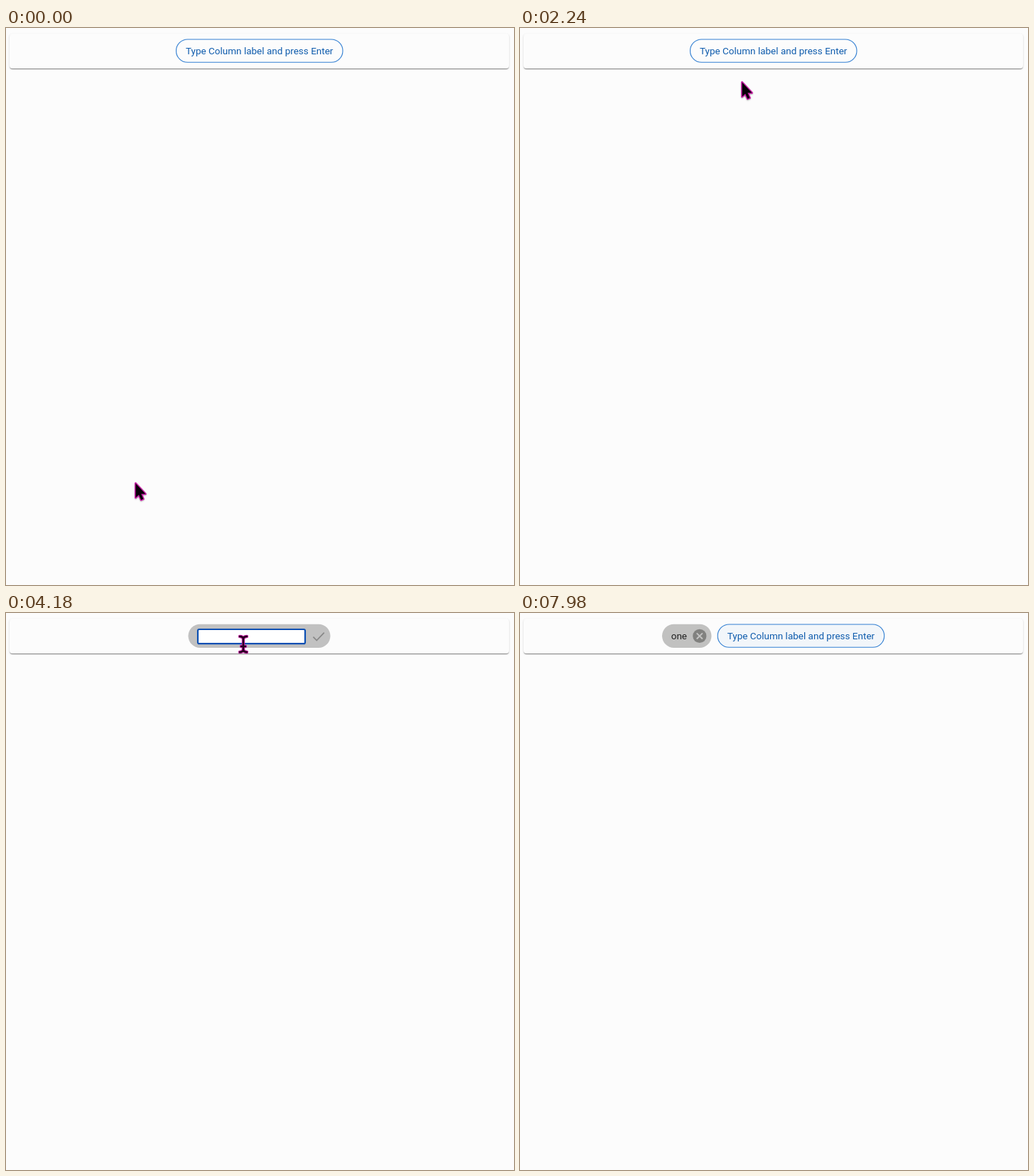
These frames come from a looping animation (715x784 px, 8 s). An HTML page with a canvas:

```html
<!DOCTYPE html>
<html lang="en">
<head>
<meta charset="utf-8">
<title>Column labels</title>
<style>
  html, body { margin: 0; width: 100%; height: 100%; overflow: hidden; background: #fcfcfc; }
  #paper {
    position: absolute; left: 5px; top: 8px; width: 703px; height: 49px; border-radius: 4px;
    background: #fcfcfc;
    box-shadow: 0 2px 1px -1px rgba(0,0,0,.28), 0 1px 1px rgba(0,0,0,.2), 0 1px 3px rgba(0,0,0,.12);
  }
  canvas { position: absolute; left: 0; top: 0; }
</style>
</head>
<body>
<div id="paper"></div>
<canvas id="stage" width="715" height="784"></canvas>
<script>
const ctx = document.getElementById('stage').getContext('2d');
const LOOP = 8000;
const PROMPT = 'Type Column label and press Enter';
const LABEL_FONT = '13.5px Roboto, sans-serif';
const INPUT_FONT = '14px "Liberation Sans", Arial, sans-serif';
const MAGENTA = '#c71fa5';

// Moments in the interaction, in ms
const HOVER = 2500, CLICK = 3400, ENTER = 6880, REFOCUS = 7700;
const KEYS = [[5300, 'o'], [5860, 'n'], [6320, 'e']];
const CARET_GAPS = [[4080, 4620], [5040, 5300]];

// Pointer hotspot: time, x, y
const POINTER = [
  [0, 181, 639], [20, 181, 639], [820, 227, 513], [1560, 211, 178], [1660, 211, 178],
  [1700, 262, 131], [1800, 262, 131], [2400, 329, 54], [2500, 329, 54], [2640, 336, 44]
];

const ARROW = new Path2D('M1.5 2.4V22.6L6 18.5L9.2 25.7L12.3 24.3L9.2 17.2H15.3Z');
const HAND = new Path2D('M4.5 2.5Q6.5 0 8.5 3L10.5 9.5Q12.5 7.5 14 9.5Q16 7.5 17.5 9.5Q20 8 21.2 11' +
  'Q23 15 20.5 19V24.5H9.5L8.5 21L1.5 15.5Q0 12.5 3 12.3L7.2 14Z');
const FINGERS = new Path2D('M12.5 15.5L13.2 20M15.7 15L16.4 20M18.7 14.5L19.2 19.5');
const IBEAM = new Path2D('M-5 -11Q0 -11 0 -7Q0 -11 5 -11M0 -7V7M-5 11Q0 11 0 7Q0 11 5 11M-3 3H3');

const clamp01 = v => Math.min(1, Math.max(0, v));
const progress = (t, start, duration) => clamp01((t - start) / duration);
const easeOut = p => 1 - (1 - p) * (1 - p);
const gray = v => `rgb(${v},${v},${v})`;

function pointerAt(t) {
  const i = POINTER.findIndex(k => k[0] > t);
  if (i < 0) return POINTER[POINTER.length - 1].slice(1);
  const [t0, x0, y0] = POINTER[i - 1], [t1, x1, y1] = POINTER[i];
  const p = (t - t0) / (t1 - t0);
  return [x0 + (x1 - x0) * p, y0 + (y1 - y0) * p];
}

function box(x, y, w, h, r, fill, stroke, lineWidth) {
  ctx.beginPath();
  ctx.roundRect(x, y, w, h, r);
  if (fill) { ctx.fillStyle = fill; ctx.fill(); }
  if (stroke) { ctx.strokeStyle = stroke; ctx.lineWidth = lineWidth; ctx.stroke(); }
}

function text(str, x, y, font, color, align = 'left') {
  ctx.font = font;
  ctx.textAlign = align;
  ctx.fillStyle = color;
  ctx.fillText(str, x, y);
}

function line(points, color, width) {
  ctx.beginPath();
  for (const [x, y] of points) ctx.lineTo(x, y);
  ctx.strokeStyle = color;
  ctx.lineWidth = width;
  ctx.stroke();
}

function promptButton(x, tint) {
  box(x + .5, 16, 234.5, 32.3, 16.15, `rgba(25,118,210,${tint})`, '#327fd2', 1.1);
  text(PROMPT, x + 117.7, 37.2, LABEL_FONT, '#0f5cad', 'center');
}

function editor(t) {
  const fade = easeOut(progress(t, CLICK, 340));
  box(256.5, 15.7, 200, 33.2, 16.6, gray(Math.round(224 - 31 * fade)));
  box(270, 23, 151, 20.2, 2, '#fff', '#0b4fb3', 2.2);
  const value = KEYS.filter(k => t >= k[0]).map(k => k[1]).join('');
  text(value, 273.2, 37.5, INPUT_FONT, '#000');
  if (!CARET_GAPS.some(([from, to]) => t >= from && t < to)) {
    ctx.fillRect(Math.round(273 + ctx.measureText(value).width), 25, 1, 15);
  }
  line([[432.4, 33.6], [437.3, 38.5], [447.8, 27.6]], gray(Math.round(168 - 32 * fade)), 1.7);
}

function labelChip() {
  box(200, 15.7, 69.5, 33.2, 16.6, '#c1c1c0');
  text('one', 212.7, 37.2, LABEL_FONT, '#1f1f1f');
  ctx.beginPath();
  ctx.arc(252.8, 32.4, 9.6, 0, Math.PI * 2);
  ctx.fillStyle = '#81817f';
  ctx.fill();
  line([[248.7, 28.3], [256.9, 36.5]], '#c4c4c3', 1.9);
  line([[256.9, 28.3], [248.7, 36.5]], '#c4c4c3', 1.9);
}

function strokePath(path, color, width) {
  ctx.strokeStyle = color;
  ctx.lineWidth = width;
  ctx.stroke(path);
}

function solidCursor(path, outline) {
  ctx.save();
  ctx.shadowColor = 'rgba(0,0,0,.25)';
  ctx.shadowBlur = 2;
  ctx.shadowOffsetY = 1;
  strokePath(path, MAGENTA, outline);
  ctx.restore();
  ctx.fillStyle = '#080008';
  ctx.fill(path);
}

function cursor(t) {
  if (t >= KEYS[0][0]) return;
  const [x, y] = pointerAt(t);
  ctx.save();
  ctx.lineJoin = 'round';
  if (t < HOVER) {
    ctx.translate(x, y - .5);
    solidCursor(ARROW, 3);
  } else if (t < CLICK) {
    ctx.translate(x - 6, y - 1);
    solidCursor(HAND, 2.4);
    strokePath(FINGERS, MAGENTA, .9);
  } else {
    ctx.translate(x - 2, y);
    ctx.lineCap = 'round';
    strokePath(IBEAM, MAGENTA, 4.4);
    strokePath(IBEAM, '#26001f', 2.4);
  }
  ctx.restore();
}

function draw(t) {
  ctx.clearRect(0, 0, 715, 784);
  if (t < CLICK) {
    promptButton(239, .04 * progress(t, HOVER, 250));
  } else if (t < ENTER) {
    editor(t);
  } else {
    labelChip();
    promptButton(277.7, .045 * progress(t, REFOCUS, 280));
  }
  cursor(t);
}

let start;
function tick(now) {
  start ??= now;
  draw((now - start) % LOOP);
  requestAnimationFrame(tick);
}
draw(0);
requestAnimationFrame(tick);
</script>
</body>
</html>
```
